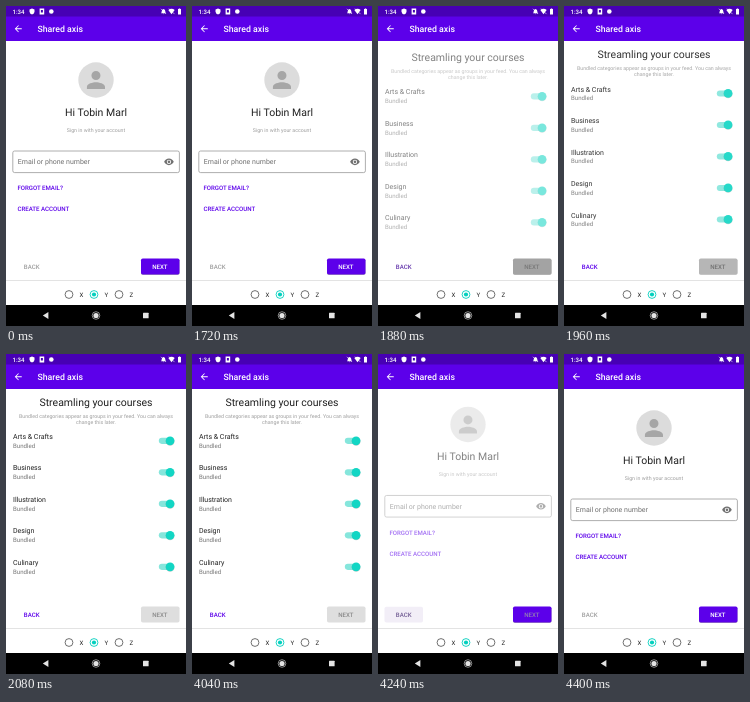
Animation, 180 px wide and 320 px high, one loop 4440 ms. Source, as an HTML page:

```html
<!DOCTYPE html>
<html lang="en">
<head>
<meta charset="utf-8">
<title>Shared axis</title>
<style>
  html, body { margin: 0; width: 100%; height: 100%; overflow: hidden; background: #fff; }
  svg { display: block; width: 100%; height: 100%; }
  text { font-family: Roboto, sans-serif; text-rendering: geometricPrecision; white-space: pre; }
  .headline { font-size: 10.5px; text-anchor: middle; fill: #212121; }
  .caption { font-size: 5.25px; text-anchor: middle; fill: #9e9e9e; }
  .body { font-size: 7px; fill: #212121; }
  .secondary { font-size: 6.125px; fill: #757575; }
  .button { font-size: 6.125px; font-weight: 500; }
  .accent { fill: #5c00ea; }
  .radio { font-size: 6.125px; text-anchor: middle; fill: #212121; }
</style>
</head>
<body>
<svg viewBox="0 0 180 320" preserveAspectRatio="none">
  <defs>
    <clipPath id="content"><rect y="35" width="180" height="239"/></clipPath>
    <filter id="blur" x="-20%" y="-40%" width="140%" height="180%"><feGaussianBlur stdDeviation=".7"/></filter>
  </defs>
  <rect width="180" height="320" fill="#fff"/>

  <g clip-path="url(#content)">
    <g id="signIn">
      <circle cx="90" cy="74" r="17.7" fill="#dcdcdc"/>
      <path transform="translate(76.4 60.4) scale(1.13)" fill="#a6a6a6"
        d="M12 12a4 4 0 1 0 0-8 4 4 0 0 0 0 8zm0 2c-2.7 0-8 1.3-8 4v2h16v-2c0-2.7-5.3-4-8-4z"/>
      <text class="headline" x="90" y="109.6">Hi Tobin Marl</text>
      <text class="caption" x="90" y="126">Sign in with your account</text>
      <rect x="6.8" y="145" width="166.6" height="21.6" rx="1.8" fill="none" stroke="#9a9a9a" stroke-width=".8"/>
      <text class="body" x="11.8" y="158.3" style="fill:#707070">Email or phone number</text>
      <path transform="translate(157.7 150.6) scale(.4375)" fill="#707070" fill-rule="evenodd"
        d="M12 4.5C7 4.5 2.7 7.6 1 12c1.7 4.4 6 7.5 11 7.5s9.3-3.1 11-7.5c-1.7-4.4-6-7.5-11-7.5zM12 17a5 5 0 1 1 0-10 5 5 0 0 1 0 10zm0-8a3 3 0 1 0 0 6 3 3 0 0 0 0-6z"/>
      <text class="button accent" x="11.4" y="184.2">FORGOT EMAIL?</text>
      <text class="button accent" x="11.4" y="205.2">CREATE ACCOUNT</text>
    </g>
    <g id="courses">
      <text class="headline" x="90" y="51.7">Streamling your courses</text>
      <text class="caption" x="90" y="63.6">Bundled categories appear as groups in your feed. You can always</text>
      <text class="caption" x="90" y="69.7">change this later.</text>
    </g>
  </g>

  <rect id="backInk" x="6.5" y="252.7" width="38.5" height="15.8" rx="1.75" fill="#4a148c"/>
  <text id="backLabel" class="button" x="17.8" y="262.7">BACK</text>
  <rect id="nextShadow" x="135" y="253.3" width="38.5" height="15.8" rx="1.75" fill="#000" opacity=".3" filter="url(#blur)"/>
  <rect id="nextFace" x="135" y="252.6" width="38.5" height="15.8" rx="1.75"/>
  <text id="nextLabel" class="button" x="146.2" y="262.7">NEXT</text>

  <rect y="274" width="180" height=".9" fill="#e0e0e0"/>
  <g id="radios"></g>

  <rect y="10" width="180" height="25" fill="#5c00ea"/>
  <rect width="180" height="10.5" fill="#4700b4"/>
  <g fill="#fff">
    <text x="6.5" y="7.8" font-size="6.1" font-weight="500">1:34</text>
    <path d="M26 2.4l2.5 1v2q0 2.2-2.5 3.2q-2.5-1-2.5-3.2v-2z"/>
    <path fill-rule="evenodd" d="M33.6 2.6h4.6v5.8h-4.6zM34.9 4h2v2.4h-2z"/>
    <circle cx="45.3" cy="5.5" r="2.3"/>
    <path d="M155 7.2q.7-.6.7-2q0-2 1.8-2.2q1.8.2 1.8 2.2q0 1.4.7 2zM156.8 7.7h1.4q-.7.9-1.4 0z"/>
    <path d="M162.3 4q3.2-2.4 6.4 0l-3.2 4.2z"/>
    <path d="M172 3h.8v-.6h1.4V3h.8v5.6h-3z"/>
    <text x="31.4" y="26.1" font-size="8.75" font-weight="500">Shared axis</text>
    <path transform="translate(7 17.5) scale(.4375)" d="M20 11H7.8l5.6-5.6L12 4l-8 8 8 8 1.4-1.4L7.8 13H20z"/>
  </g>
  <path d="M154.9 2.8l5.2 5.2M163 2.6l5.5 5.5" stroke="#fff" stroke-width=".6"/>

  <rect y="299" width="180" height="21" fill="#000"/>
  <g fill="#e4e4e4">
    <path d="M36.8 309.5l5.6-3.4v6.8z"/>
    <circle cx="90" cy="309.5" r="2.6"/>
    <circle cx="90" cy="309.5" r="3.8" fill="none" stroke="#e4e4e4" stroke-width=".6"/>
    <rect x="137" y="306.7" width="5.6" height="5.6" rx=".5"/>
  </g>
</svg>
<script>
const LOOP = 4440, STEP = 40, DURATION = 300, SHIFT = 13.1;
const FORWARD = 1740, TAP_BACK = 4040, BACKWARD = 4100;
const PURPLE = [92, 0, 234, 1], WHITE = [255, 255, 255, 1], DISABLED = [0, 0, 0, .38];

const el = id => document.getElementById(id);
const clamp = x => Math.min(1, Math.max(0, x));
const mix = (a, b, p) => a + (b - a) * p;
const rgba = (from, to, p) => `rgba(${from.map((v, i) => mix(v, to[i], p))})`;

function bezier(x1, y1, x2, y2) {
  const at = (a, b, s) => 3 * (1 - s) ** 2 * s * a + 3 * (1 - s) * s * s * b + s ** 3;
  return value => {
    const x = clamp(value);
    if (x === 0 || x === 1) return x;
    let low = 0, high = 1;
    for (let i = 0; i < 24; i++) {
      const mid = (low + high) / 2;
      if (at(x1, x2, mid) < x) low = mid; else high = mid;
    }
    return at(y1, y2, low);
  };
}
const standard = bezier(.4, 0, .2, 1);
const accelerate = bezier(.4, 0, 1, 1);
const decelerate = bezier(0, 0, .2, 1);

el('courses').innerHTML += ['Arts & Crafts', 'Business', 'Illustration', 'Design', 'Culinary'].map((name, i) => `
  <g transform="translate(0 ${i * 31.5})">
    <text class="body" x="7" y="84.9">${name.replace('&', '&amp;')}</text>
    <text class="secondary" x="7" y="93.6">Bundled</text>
    <rect x="152.8" y="83.8" width="14.6" height="6.1" rx="3.05" fill="#86e6dc"/>
    <circle cx="164.1" cy="87.3" r="4.4" fill="#000" opacity=".18" filter="url(#blur)"/>
    <circle cx="164.1" cy="86.8" r="4.35" fill="#12d6c4"/>
  </g>`).join('');

el('radios').innerHTML = ['X', 'Y', 'Z'].map((axis, i) => {
  const x = 63 + i * 25, on = axis === 'Y', color = on ? '#03d0be' : '#606060';
  return `<circle cx="${x}" cy="288.5" r="3.9" fill="none" stroke="${color}" stroke-width=".9"/>
    ${on ? `<circle cx="${x}" cy="288.5" r="2.1" fill="${color}"/>` : ''}
    <text class="radio" x="${x + 12.3}" y="290.7">${axis}</text>`;
}).join('');

function place(page, y, opacity) {
  page.setAttribute('transform', `translate(0 ${y})`);
  page.setAttribute('opacity', opacity);
}

function sharedAxis(outgoing, incoming, p, direction) {
  const travel = standard(p);
  place(outgoing, -direction * SHIFT * travel, 1 - accelerate(p / .3));
  place(incoming, direction * SHIFT * (1 - travel), decelerate((p - .3) / .7));
}

function draw(t) {
  const returning = t >= TAP_BACK;
  const start = returning ? BACKWARD : FORWARD;
  const p = clamp((t - start) / DURATION);
  if (returning) sharedAxis(el('courses'), el('signIn'), p, -1);
  else sharedAxis(el('signIn'), el('courses'), p, 1);

  const switched = t >= start;
  const nextEnabled = returning === switched;
  const labels = clamp((t - start) / 220);
  const toCourses = returning ? 1 - labels : labels;
  el('backLabel').style.fill = rgba(DISABLED, PURPLE, toCourses);
  el('nextLabel').style.fill = rgba(WHITE, DISABLED, toCourses);

  // The raised shadow shows through the translucent disabled face until it settles.
  const settle = clamp((t - FORWARD) / 330) ** 2;
  const gray = mix(150, 222, settle);
  el('nextFace').style.fill = nextEnabled ? rgba(PURPLE, PURPLE, 0) : `rgb(${gray},${gray},${gray})`;
  el('nextShadow').setAttribute('opacity', nextEnabled ? .3 : .3 * (1 - settle));

  const ink = returning ? Math.min(clamp((t - TAP_BACK) / 100), clamp((4400 - t) / 160)) : 0;
  el('backInk').setAttribute('opacity', .07 * ink);
}

function tick() {
  draw(Math.floor(performance.now() % LOOP / STEP) * STEP);
  requestAnimationFrame(tick);
}
tick();
</script>
</body>
</html>
```
